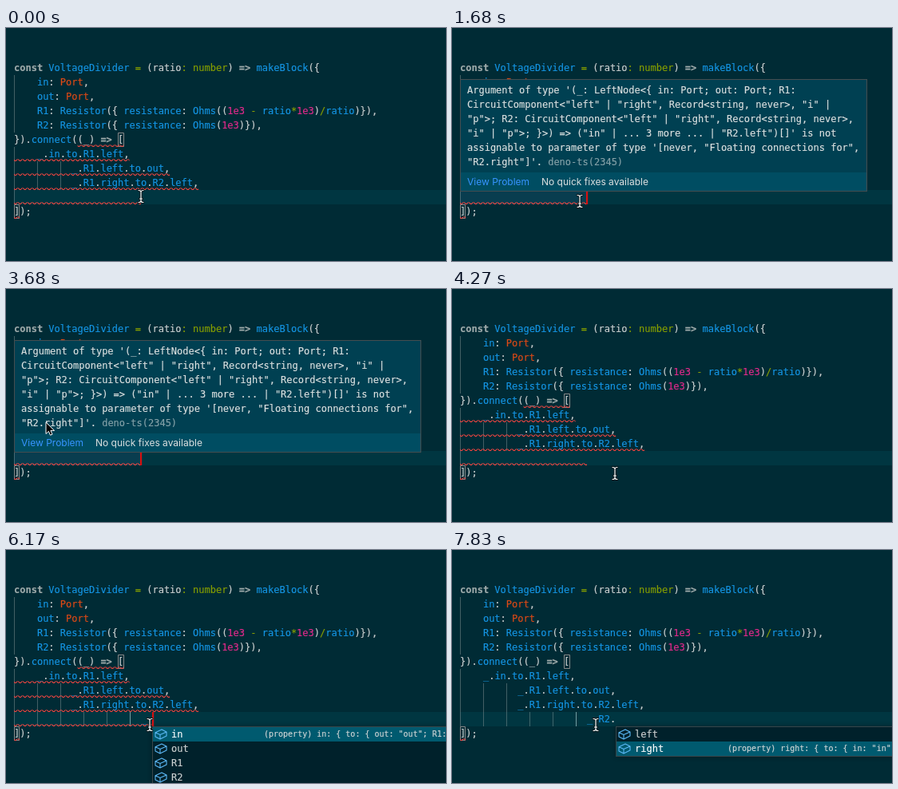
Animation of 551 by 292 pixels, one loop 8 s. Source, as an HTML page:

```html
<!DOCTYPE html>
<html lang="en">
<head>
<meta charset="utf-8">
<title>Voltage divider in the editor</title>
<style>
html, body { margin: 0; width: 100%; height: 100%; overflow: hidden; background: #002b35; }
#stage { position: relative; width: 551px; height: 292px; overflow: hidden; }
#stage > * { position: absolute; }
.layer { left: 0; top: 0; width: 551px; height: 292px; }
pre, .sug { margin: 0; font: 12px/18px "DejaVu Sans Mono", "Liberation Mono", monospace; color: #cdd1d1; -webkit-text-stroke: .15px; }
#line { left: 10px; top: 203px; width: 541px; height: 18px; background: #003641; }
#range { left: 10px; top: 203px; width: 159px; height: 18px; background: rgba(38, 79, 120, .25); }
#code { left: 10px; top: 41px; }
b { color: #9fabab; }
i { font-style: normal; color: #1495e4; }
u { text-decoration: none; color: #859e00; }
s { text-decoration: none; color: #e32a8c; }
em { font-style: normal; color: #dd4a16; }
.guide { fill: #93a1a1; fill-opacity: .45; }
.guide .active { fill: #c3e1e1; fill-opacity: .6; }
.match { fill: none; stroke: #888; }
#caret { left: 0; top: 203px; width: 2px; height: 18px; background: #dc0f0f; animation: blink 8s step-end infinite, caret 8s step-end infinite; }

/* hover box */
#hover, #range { animation: hover 8s step-end infinite; }
#hover { left: 10px; top: 64px; width: 508px; height: 139px; border: 1px solid #454d50; background: #004052; }
#hover pre { padding: 4px 8px; color: #dce0e0; }
#hover small { font-size: 12px; opacity: .6; }
#bar { position: absolute; left: 0; right: 0; bottom: 0; height: 23px; padding-left: 8px; background: #004d62; font: 12px/23px Inter, "Open Sans", sans-serif; color: #dce0e0; }
#bar span { position: absolute; left: 101px; }
#bar a { color: #3794ff; }

/* suggestion lists */
.sug { top: 221px; width: 430px; border: 1px solid #39464a; background: #00212b; box-shadow: 0 0 6px rgba(0, 0, 0, .36); white-space: nowrap; }
.row { position: relative; height: 18px; padding-left: 23px; }
.row svg { position: absolute; left: 2px; top: 1px; width: 16px; height: 16px; }
.row.on { background: #005a6f; color: #fff; }
.row small { position: absolute; left: 139px; font-size: 10px; color: #d2d6d6; }
.sug i { color: #2aaaff; }
.icon { fill: none; stroke: #5cb8f5; stroke-width: 1.1; stroke-linejoin: round; }

/* typing and errors */
.k1, .k2, .k3, .k4, .k5, .p1, .p2, .p3, .p4, .errR { opacity: 0; animation: 8s step-end infinite; }
.k1 { animation-name: k1; }
.k2 { animation-name: k2; }
.k3 { animation-name: k3; }
.k4 { animation-name: k4; }
.k5 { animation-name: k5; }
.p1 { left: 176px; animation-name: p1; }
.p2 { left: 183px; animation-name: p2; }
.p3 { left: 191px; animation-name: p3; }
.p4 { left: 205px; animation-name: k5; }
.err { animation: err 8s step-end infinite; }
.errEnd { animation: errEnd 8s step-end infinite; }
.errR { animation-name: errR; }
@keyframes k1 { 0% { opacity: 0 } 71.2%, 100% { opacity: 1 } }
@keyframes k2 { 0% { opacity: 0 } 74.2%, 100% { opacity: 1 } }
@keyframes k3 { 0% { opacity: 0 } 78.6%, 100% { opacity: 1 } }
@keyframes k4 { 0% { opacity: 0 } 87.5%, 100% { opacity: 1 } }
@keyframes k5 { 0% { opacity: 0 } 91.9%, 100% { opacity: 1 } }
@keyframes p1 { 0% { opacity: 0 } 71.2% { opacity: 1 } 74.2%, 100% { opacity: 0 } }
@keyframes p2 { 0% { opacity: 0 } 74.2% { opacity: 1 } 78.6%, 100% { opacity: 0 } }
@keyframes p3 { 0% { opacity: 0 } 78.6% { opacity: 1 } 87.5%, 100% { opacity: 0 } }
@keyframes err { 0% { opacity: 1 } 80.1% { opacity: 0 } 90.5% { opacity: 1 } 95%, 100% { opacity: 0 } }
@keyframes errEnd { 0% { opacity: 1 } 80.1% { opacity: 0 } 90.5%, 100% { opacity: 1 } }
@keyframes errR { 0% { opacity: 0 } 80.1% { opacity: 1 } 90.5%, 100% { opacity: 0 } }
@keyframes hover { 0% { opacity: 0 } 19.5% { opacity: .5 } 20.9% { opacity: 1 } 51.9%, 100% { opacity: 0 } }
@keyframes blink {
  0% { opacity: 0 } 7.5% { opacity: 1 } 13.5% { opacity: 0 } 19.5% { opacity: 1 }
  25.5% { opacity: 0 } 32% { opacity: 1 } 38.6% { opacity: 0 } 44.5% { opacity: 1 }
  50.4% { opacity: 0 } 56.4% { opacity: 1 } 62.3% { opacity: 0 } 68.2% { opacity: 1 }
  84.6% { opacity: 0 } 87.5% { opacity: 1 } 97.8%, 100% { opacity: 0 }
}
@keyframes caret {
  0% { transform: translateX(168px) }
  71.2% { transform: translateX(175px) }
  74.2% { transform: translateX(183px) }
  78.6% { transform: translateX(190px) }
  87.5% { transform: translateX(197px) }
  91.9%, 100% { transform: translateX(204px) }
}

/* mouse */
#mouse { animation: mouse 8s steps(1, start) infinite; }
#beam { animation: beam 8s step-end infinite; fill: none; stroke-linecap: round; }
#arrow { animation: arrow 8s step-end infinite; }
@keyframes beam { 0% { opacity: 1 } 28.5% { opacity: 0 } 51.9%, 100% { opacity: 1 } }
@keyframes arrow { 0% { opacity: 0 } 28.5% { opacity: 1 } 51.9%, 100% { opacity: 0 } }
@keyframes mouse {
  0% { transform: translate(169px, 211px) }
  10.5% { transform: translate(169px, 211px); animation-timing-function: steps(4, start) }
  16.5% { transform: translate(160px, 217px) }
  28.5% { transform: translate(160px, 217px); animation-timing-function: steps(2, start) }
  31.5% { transform: translate(330px, 160px); animation-timing-function: steps(2, start) }
  34.5% { transform: translate(407px, 153px); animation-timing-function: steps(3, start) }
  38.8% { transform: translate(86px, 161px); animation-timing-function: steps(2, start) }
  41.8% { transform: translate(62px, 141px); animation-timing-function: steps(2, start) }
  44.5% { transform: translate(27px, 163px) }
  45.9% { transform: translate(38px, 170px) }
  47.5% { transform: translate(50px, 167px) }
  49% { transform: translate(58px, 173px); animation-timing-function: steps(4, start) }
  54.8% { transform: translate(204px, 231px); animation-timing-function: steps(3, start) }
  59.3% { transform: translate(180px, 221px); animation-timing-function: step-end }
  59.35%, 100% { transform: translate(180px, 219px) }
}
</style>
</head>
<body>
<div id="stage">
  <div id="line"></div>
  <div id="range"></div>

  <svg class="layer" viewBox="0 0 551 292">
    <defs>
      <pattern id="wave" width="6" height="3" patternUnits="userSpaceOnUse">
        <path fill="#ff4640" d="M5.5 0L2.5 3H1.1L4.1 0ZM4 0L6 2V.6L5.4 0ZM0 2L1 3H2.4L0 .6Z"/>
      </pattern>
      <symbol id="field" viewBox="0 0 16 16">
        <path class="icon" d="M1 5.7L9 2L15 5V10L7 14L1 11ZM1 5.7L7 8.5L15 5M7 8.5V14"/>
      </symbol>
      <symbol id="variable" viewBox="0 0 16 16">
        <path class="icon" d="M3.5 3H1V13H3.5M12.5 3H15V13H12.5M4.5 7.2L8.5 5L11.5 6.5V9L7.5 11.2L4.5 9.6ZM4.5 7.2L7.5 8.7L11.5 6.5"/>
      </symbol>
      <path id="ibeam" d="M-3-7.5Q0-7.5 0-5.5Q0-7.5 3-7.5M0-5.5V5.5M-3 7.5Q0 7.5 0 5.5Q0 7.5 3 7.5M-1.5 3H1.5"/>
    </defs>
    <g class="guide">
      <path d="M10 59h1v72h-1zM10 149h1v72h-1zM39 167h1v36h-1zM68 167h1v36h-1z"/>
      <g class="k1">
        <path d="M39 203h1v18h-1zM68 203h1v18h-1zM97 203h1v18h-1zM126 203h1v18h-1z"/>
        <path class="active" d="M155 203h1v18h-1z"/>
      </g>
    </g>
    <path class="match" d="M140.5 131.5h7v17h-7zM10.5 221.5h6v17h-6z"/>
  </svg>

<pre id="code"><b>const</b> <i>VoltageDivider</i> <u>=</u> (ratio<u>:</u> <u>number</u>) <b>=&gt;</b> <i>makeBlock</i>({
    <i>in</i>: <em>Port</em>,
    <i>out</i>: <em>Port</em>,
    <i>R1</i>: <i>Resistor</i>({ <i>resistance</i>: <i>Ohms</i>((<s>1e3</s> <u>-</u> <i>ratio</i><u>*</u><s>1e3</s>)<u>/</u><i>ratio</i>)}),
    <i>R2</i>: <i>Resistor</i>({ <i>resistance</i>: <i>Ohms</i>(<s>1e3</s>)}),
}).<i>connect</i>((_) <b>=&gt;</b> [
    <i>_</i>.<i>in</i>.<i>to</i>.<i>R1</i>.<i>left</i>,
          <i>_</i>.<i>R1</i>.<i>left</i>.<i>to</i>.<i>out</i>,
          <i>_</i>.<i>R1</i>.<i>right</i>.<i>to</i>.<i>R2</i>.<i>left</i>,
                      <i class="k1">_</i><span class="k2">.</span><i class="k3">R</i><i class="k4">2</i><span class="k5">.</span>
]);</pre>

  <svg class="layer" viewBox="0 0 551 292" fill="url(#wave)">
    <g class="err">
      <g transform="translate(89.5 146)"><rect width="58" height="3"/></g>
      <g transform="translate(10 164)"><rect width="144.5" height="3"/></g>
      <g transform="translate(10 182)"><rect width="195" height="3"/></g>
      <g transform="translate(10 200)"><rect width="231" height="3"/></g>
      <g transform="translate(10 218)">
        <rect width="159" height="3"/>
        <rect class="k1" x="159" width="7" height="3"/>
        <rect class="k2" x="166" width="7" height="3"/>
        <rect class="k3" x="173" width="8" height="3"/>
        <rect class="k4" x="181" width="7" height="3"/>
      </g>
    </g>
    <g class="errEnd" transform="translate(10 236)"><rect width="7" height="3"/></g>
    <g class="errR" transform="translate(183.4 218)"><rect width="7" height="3"/></g>
  </svg>

  <div id="caret"></div>

  <div id="hover">
<pre>Argument of type '(_: LeftNode&lt;{ in: Port; out: Port; R1:
CircuitComponent&lt;"left" | "right", Record&lt;string, never&gt;, "i" |
"p"&gt;; R2: CircuitComponent&lt;"left" | "right", Record&lt;string, never&gt;,
"i" | "p"&gt;; }&gt;) =&gt; ("in" | ... 3 more ... | "R2.left")[]' is not
assignable to parameter of type '[never, "Floating connections for",
"R2.right"]'. <small>deno-ts(2345)</small></pre>
    <div id="bar"><a>View Problem</a><span>No quick fixes available</span></div>
  </div>

  <div class="sug p1">
    <div class="row on"><svg><use href="#variable"/></svg><i>_</i></div>
  </div>
  <div class="sug p2">
    <div class="row on"><svg><use href="#field"/></svg>in<small>(property) in: { to: { out: "out"; R1:</small></div>
    <div class="row"><svg><use href="#field"/></svg>out</div>
    <div class="row"><svg><use href="#field"/></svg>R1</div>
    <div class="row"><svg><use href="#field"/></svg>R2</div>
  </div>
  <div class="sug p3">
    <div class="row on"><svg><use href="#field"/></svg><i>R</i>1<small>(property) R1: { left: { to: { in: "in"</small></div>
    <div class="row"><svg><use href="#field"/></svg><i>R</i>2</div>
  </div>
  <div class="sug p4">
    <div class="row"><svg><use href="#field"/></svg>left</div>
    <div class="row on"><svg><use href="#field"/></svg>right<small>(property) right: { to: { in: "in"</small></div>
  </div>

  <svg class="layer" viewBox="0 0 551 292">
    <g id="mouse">
      <g id="beam">
        <use href="#ibeam" stroke="#001216" stroke-width="2.8"/>
        <use href="#ibeam" stroke="#fff" stroke-width="1.2"/>
      </g>
      <path id="arrow" fill="#000" stroke="#fff" stroke-linejoin="round" d="M0 0V14.5L3.4 11.3L5.5 16.2L8 15.1L5.9 10.4H10.6Z"/>
    </g>
  </svg>
</div>
</body>
</html>
```
